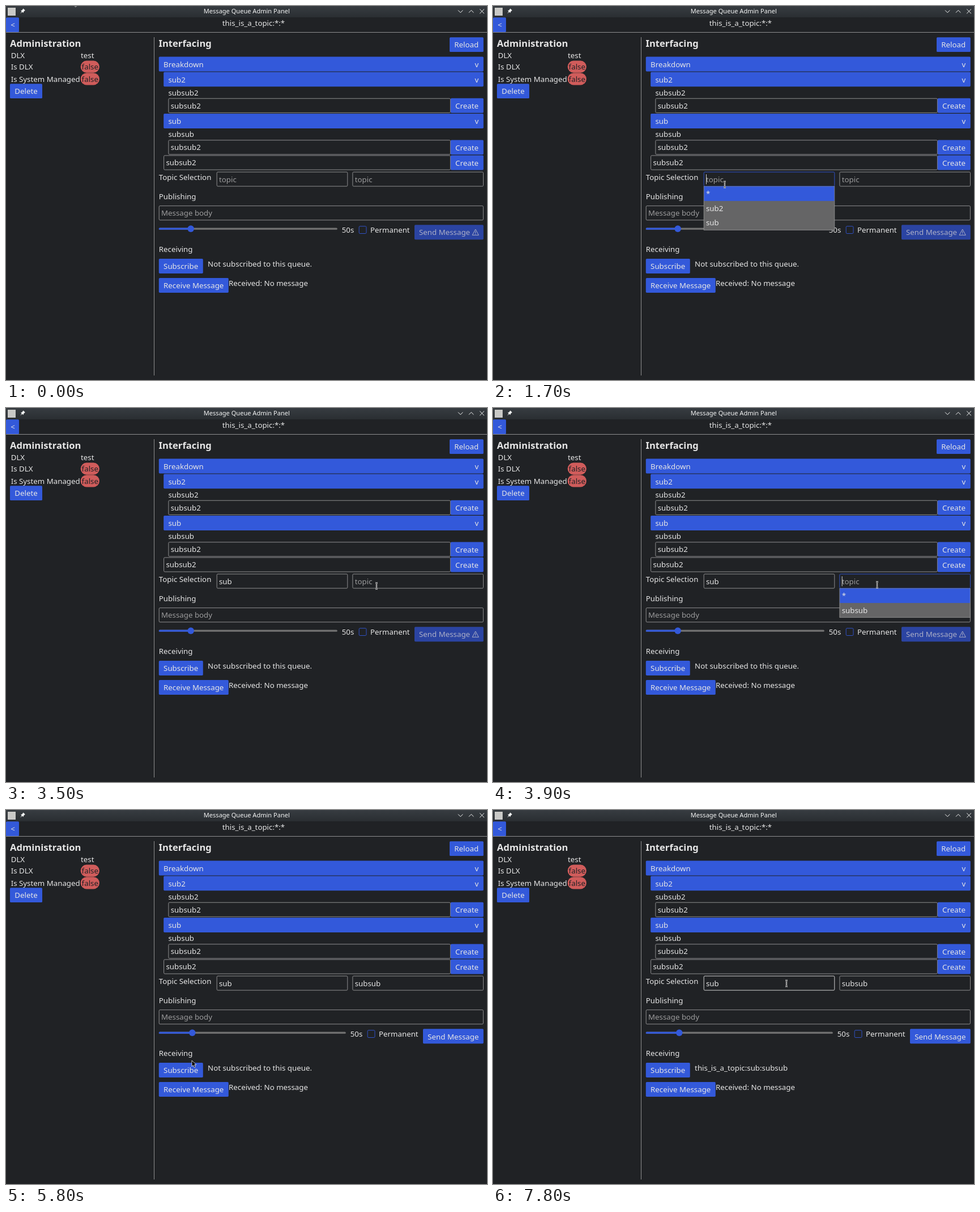
Recreate the animation shown at these times as an HTML page. Size 849 px wide and 660 px high, loop 8 s.

```html
<!DOCTYPE html>
<html lang="en">
<head>
<meta charset="utf-8">
<title>Message Queue Admin Panel</title>
<style>
html, body { margin: 0; width: 100%; height: 100%; overflow: hidden; background: #202225; }
svg { display: block; font: 13.3px "Noto Sans", sans-serif; }
text { fill: #e6e6e6; white-space: pre; }
.title { font-size: 11.05px; fill: #f4f5f5; }
.head { font-size: 16.6px; font-weight: 700; }
.hint { fill: #9b9b9c; }
.dim { fill: #abaec6; }
.dark { fill: #202225; }
.btn { fill: #3359da; }
.btn.hover { fill: #5e7ce2; }
.off { fill: #2b44a2; }
.box { fill: #202225; stroke: #9b9b9c; stroke-width: .9; }
.box.hover { stroke: #e6e6e6; }
.box.focus { stroke: #3359da; }
.check { fill: #202225; stroke: #3359da; stroke-width: .9; }
.rule { fill: #9b9b9c; }
.rail { fill: #737373; }
.pill { fill: #d05c5b; }
.menu { fill: #656566; stroke: #9b9b9c; stroke-width: .8; }
.icon { fill: none; stroke: #f4f5f5; stroke-width: 1; }
.pointer { fill: #000; stroke: #fff; stroke-width: .75; stroke-linejoin: round; }
.beam { fill: none; }
</style>
</head>
<body>
<svg id="stage" width="849" height="660" viewBox="0 0 849 660">
  <defs>
    <linearGradient id="bar" x2="0" y2="1">
      <stop stop-color="#373c41"/><stop offset="1" stop-color="#2a2e32"/>
    </linearGradient>
  </defs>
  <rect width="849" height="660" fill="#202225"/>
  <rect width="849" height="20" fill="url(#bar)"/>
  <rect x="3" y="3" width="14" height="14" fill="#c9c9c7"/>
  <path d="M30.5 4.5L33.8 7.8L32.8 8.6L31 10.2L30.6 12.2L28.6 10.6L25.2 13.4L27.6 9.8L26 8L28.2 7.5L29.8 5.6Z" fill="#f4f5f5"/>
  <path class="icon" d="M798 7.5L802.2 11.7L806.4 7.5M817 11.7L821.2 7.5L825.4 11.7M836.2 5.5L844 13.3M844 5.5L836.2 13.3"/>
</svg>
<script>
const stage = document.getElementById("stage");

function add(parent, tag, attrs, content = "") {
  const el = document.createElementNS("http://www.w3.org/2000/svg", tag);
  for (const key in attrs) el.setAttribute(key, attrs[key]);
  el.textContent = content;
  return parent.appendChild(el);
}
const group = (parent = stage) => add(parent, "g", {});
const rect = (parent, cls, x, y, width, height, rx = 0) =>
  add(parent, "rect", { class: cls, x, y, width, height, rx });
const label = (parent, x, y, content, cls = "") =>
  add(parent, "text", { x, y, class: cls }, content);
const show = (el, on) => { el.style.display = on ? "" : "none"; };

const ROW = 25.9;
const widgets = [];
const register = (kind, el, x, y, w, h = ROW) => {
  const widget = { kind, el, x, y, w, h };
  widgets.push(widget);
  return widget;
};
const inside = (p, r) => p.x >= r.x && p.x < r.x + r.w && p.y >= r.y && p.y < r.y + r.h;

function button(x, y, w, content, parent = stage) {
  register("button", rect(parent, "btn", x, y, w, ROW, 1.7), x, y, w);
  label(parent, x + 8.3, y + 18.2, content);
}
function fold(x, y, content) {
  button(x, y, 842.8 - x, content);
  label(stage, 827.4, y + 18.2, "v");
}
function input(x, y, w, content, cls = "") {
  const el = rect(stage, "box", x + .4, y + .4, w - .8, ROW - .8, 1.7);
  const field = register("input", el, x, y, w);
  field.text = label(stage, x + 4.2, y + 17.9, content, cls);
  return field;
}

// Header and administration column
label(stage, 348.8, 13.2, "Message Queue Admin Panel", "title");
label(stage, 381.8, 34.5, "this_is_a_topic:*:*");
button(0, 20.2, 23, "<");
rect(stage, "rule", 0, 46, 849, .9);
rect(stage, "rule", 261, 55, .9, 597);
label(stage, 7, 72, "Administration", "head");
label(stage, 8.7, 92, "DLX");
label(stage, 132, 92, "test");
[["Is DLX", 112.2], ["Is System Managed", 133.8]].forEach(([name, y]) => {
  label(stage, 8.7, y, name);
  rect(stage, "pill", 131.7, y - 15.6, 33.2, 21.2, 10.5);
  label(stage, 133.6, y, "false", "dark");
});
button(7, 137.2, 57, "Delete");

// Interfacing column
label(stage, 269.5, 72, "Interfacing", "head");
button(783, 55.2, 59.8, "Reload");
fold(269.8, 89.5, "Breakdown");
fold(278.2, 116.4, "sub2");
label(stage, 286.5, 157.7, "subsub2");
fold(278.2, 190, "sub");
label(stage, 286.5, 231.2, "subsub");
[[286.5, 162.8], [286.5, 236.4], [278.2, 263.5]].forEach(([x, y]) => {
  input(x, y, 784.8 - x, "subsub2");
  button(784.8, y, 58, "Create");
});
label(stage, 269.8, 306.7, "Topic Selection");
const first = input(371.8, 292.6, 231.4, "topic", "hint");
const second = input(611.5, 292.6, 231.4, "topic", "hint");
label(stage, 269.8, 340.5, "Publishing");
input(269.8, 352.3, 573, "Message body", "hint");

function sendRow(shift, knob) {
  const g = group();
  rect(g, "rail", 269.8, 391.5, 315 + shift, 3.3, 1.6);
  rect(g, "btn", 269.8, 391.5, knob - 269.8, 3.3, 1.6);
  add(g, "circle", { class: "btn", cx: knob, cy: 393.1, r: 5.8 });
  label(g, 592.7 + shift, 400.3, "50s");
  rect(g, "check", 623.2 + shift, 388.7, 12.8, 12.8, 1.7);
  label(g, 643 + shift, 400.3, "Permanent");
  return g;
}
const locked = sendRow(0, 326.2);
rect(locked, "off", 721, 386.3, 121.8, ROW, 1.7);
label(locked, 729, 404.4, "Send Message", "dim");
add(locked, "path", {
  d: "M828.7 394L834.3 404.3H823.1ZM828.7 397.3V401M828.7 401.9V403",
  fill: "none", stroke: "#abaec6"
});
const ready = sendRow(15, 328.8);
button(736, 386.3, 106.8, "Send Message", ready);

label(stage, 269.8, 434.3, "Receiving");
button(269.8, 446, 78, "Subscribe");
const status = label(stage, 356.1, 459.8, "");
button(269.8, 480, 123, "Receive Message");
label(stage, 393, 493.8, "Received: No message");

function dropdown(field, items, open, caretEnd, close) {
  const g = group();
  const height = 25.6;
  const y = field.y + ROW;
  const caret = rect(g, "", field.x + 4.2, 297, .9, 17.5);
  caret.setAttribute("fill", "#e6e6e6");
  rect(g, "menu", field.x + .4, y, field.w - .8, items.length * height, 0);
  const rows = items.map((name, i) => {
    const row = { x: field.x, y: y + i * height, w: field.w, h: height };
    row.el = rect(g, "btn", row.x + .8, row.y, row.w - 1.6, height);
    label(g, row.x + 4.2, row.y + 17.7, name);
    return row;
  });
  return { g, field, rows, caret, open, caretEnd, close };
}
const menus = [
  dropdown(first, ["*", "sub2", "sub"], 1700, 2400, 3000),
  dropdown(second, ["*", "subsub"], 3900, 4400, 4900)
];

// Mouse pointer shapes, hot spot at 0,0
const pointer = group();
const arrow = add(pointer, "path", {
  class: "pointer", d: "M0 0V10.6L2.5 8.4L4.3 12.5L6.3 11.6L4.6 7.6H8Z"
});
const hand = add(pointer, "path", {
  class: "pointer", d: "M-1.1 1Q0-.7 1.1 1V4.6L5.2 5.5Q6.6 6 6.3 7.5L5.6 11.3H.2L-3 7Q-2.6 5.5-1.1 6.8Z"
});
const beam = group(pointer);
[["#fff", 2.3], ["#000", .8]].forEach(([stroke, width]) => add(beam, "path", {
  class: "beam", stroke, "stroke-width": width,
  d: "M-2-5.3Q0-5.3 0-4V4Q0 5.3-2 5.3M2-5.3Q0-5.3 0-4M0 4Q0 5.3 2 5.3"
}));

const LOOP = 8000, STEP = 100;
const path = [
  [100, 118, -11], [500, 290, 165], [700, 375, 275], [900, 408, 313], [1000, 409, 315],
  [2300, 409, 315], [2500, 408, 350], [2600, 408, 359], [2900, 408, 380],
  [3200, 408, 380], [3500, 654, 314], [3900, 678, 312],
  [4300, 678, 312], [4600, 678, 355], [4700, 678, 356],
  [5300, 678, 356], [5800, 328, 442], [6100, 318, 460],
  [7100, 318, 460], [7500, 490, 330], [7700, 516, 308], [7800, 518, 306]
];
function mouseAt(t) {
  const next = path.findIndex(p => p[0] > t);
  if (next < 1) {
    const [, x, y] = next ? path[path.length - 1] : path[0];
    return { x, y };
  }
  const [t0, x0, y0] = path[next - 1];
  const [t1, x1, y1] = path[next];
  const k = (t - t0) / (t1 - t0);
  return { x: x0 + (x1 - x0) * k, y: y0 + (y1 - y0) * k };
}

function fill(field, value) {
  field.text.textContent = value || "topic";
  field.text.setAttribute("class", value ? "" : "hint");
}

function render(t) {
  const mouse = mouseAt(t);
  const felt = mouseAt(t - STEP); // the interface reacts one step late
  const menu = menus.find(m => t >= m.open && t < m.close);

  fill(first, t >= 3000 && "sub");
  fill(second, t >= 4900 && "subsub");
  show(locked, t < 4900);
  show(ready, t >= 4900);
  status.textContent = t < 6200 ? "Not subscribed to this queue." : "this_is_a_topic:sub:subsub";

  for (const w of widgets) {
    w.el.classList.toggle("hover", !menu && inside(felt, w));
    w.el.classList.toggle("focus", !!menu && menu.field === w);
  }
  for (const m of menus) {
    show(m.g, m === menu);
    show(m.caret, t < m.caretEnd);
    const active = m.rows.find(r => inside(felt, r)) || m.rows[0];
    m.rows.forEach(r => show(r.el, r === active));
  }

  const over = widgets.find(w => inside(mouse, w));
  const onMenu = menu && menu.rows.some(r => inside(mouse, r));
  const onSlider = inside(mouse, { x: 270, y: 379, w: 315, h: 21 });
  const shape = onMenu || onSlider || (over && over.kind === "button") ? hand
    : over ? beam : arrow;
  [arrow, hand, beam].forEach(s => show(s, s === shape));
  pointer.setAttribute("transform", `translate(${mouse.x} ${mouse.y})`);
}

const start = performance.now();
function tick() {
  const t = (performance.now() - start) % LOOP;
  render(Math.floor(t / STEP) * STEP);
  requestAnimationFrame(tick);
}
tick();
</script>
</body>
</html>
```
